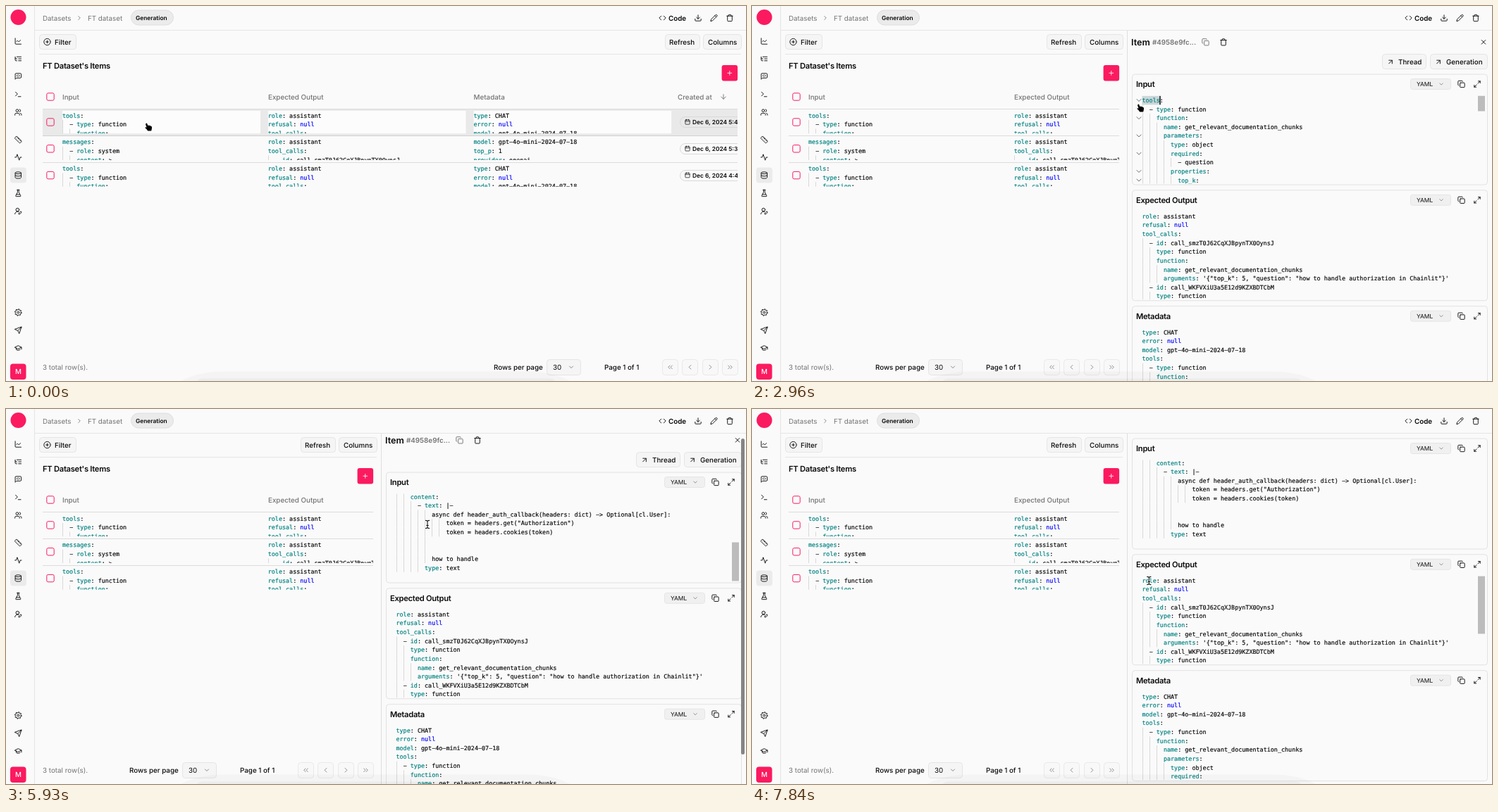
Animation, 1050 px wide and 533 px high, one loop 7990 ms. Source, as an HTML page with a canvas:

```html
<!DOCTYPE html>
<html lang="en">
<head>
<meta charset="utf-8">
<title>Dataset items</title>
<style>
html, body { margin: 0; width: 100%; height: 100%; overflow: hidden; background: #fafafa; }
canvas { display: block; width: 1050px; height: 533px; }
</style>
</head>
<body>
<canvas id="stage" width="1050" height="533"></canvas>
<script>
const ctx = document.getElementById('stage').getContext('2d');
const LOOP = 7990;
const INK = '#0a0a0a', MUTED = '#737373', LINE = '#e5e5e5', PAGE = '#fafafa', PINK = '#fb1a5f';
const MONO = 8.416, CHAR = MONO * 0.60205, ROW = 12.62, DOC_END = 166.5;

// Icons on a 24 unit grid
const disc = (x, y, r) => `M${x + r} ${y}a${r} ${r} 0 1 1-${2 * r} 0a${r} ${r} 0 1 1 ${2 * r} 0`;
const gear = () => {
  let d = '';
  for (let i = 0; i < 32; i++) {
    const a = (i + 0.5) * Math.PI / 16, r = i % 4 < 2 ? 10.5 : 7.6;
    d += `${i ? 'L' : 'M'}${(12 + r * Math.cos(a)).toFixed(1)} ${(12 + r * Math.sin(a)).toFixed(1)}`;
  }
  return d + 'Z' + disc(12, 12, 3);
};
const shapes = {
  chart: 'M3 3v16a2 2 0 0 0 2 2h16M19 9l-5 5-4-4-3 3',
  tree: 'M21 12h-8M21 6H8M21 18h-8M3 6v4c0 1.1.9 2 2 2h3M3 10v6c0 1.1.9 2 2 2h3',
  message: 'M21 15a2 2 0 0 1-2 2H7l-4 4V5a2 2 0 0 1 2-2h14a2 2 0 0 1 2 2zM10 7.5L8 10l2 2.5M14 7.5l2 2.5-2 2.5',
  terminal: 'M4 17l6-6-6-6M12 19h8',
  users: 'M16 21v-2a4 4 0 0 0-4-4H6a4 4 0 0 0-4 4v2M22 21v-2a4 4 0 0 0-3-3.9M16 3.1a4 4 0 0 1 0 7.8' + disc(9, 7, 4),
  ruler: 'M21.3 15.3a2.4 2.4 0 0 1 0 3.4l-2.6 2.6a2.4 2.4 0 0 1-3.4 0L2.7 8.7a2.4 2.4 0 0 1 0-3.4l2.6-2.6a2.4 2.4 0 0 1 3.4 0zM14.5 12.5l2-2M11.5 9.5l2-2M8.5 6.5l2-2M17.5 15.5l2-2',
  pulse: 'M22 12h-4l-3 9L9 3l-3 9H2',
  database: 'M21 5a9 3 0 1 1-18 0a9 3 0 1 1 18 0M3 5v14a9 3 0 0 0 18 0V5M3 12a9 3 0 0 0 18 0',
  flask: 'M10 2v7.5L4.5 20a1.5 1.5 0 0 0 1.3 2h12.4a1.5 1.5 0 0 0 1.3-2L14 9.5V2M8.5 2h7M7 16h10',
  userPen: 'M2 21a8 8 0 0 1 11-7.4M21.4 16.6a1 1 0 0 0-3-3l-4 4-1 4 4-1z' + disc(10, 8, 5),
  gear: gear(),
  send: 'M22 2l-7 20-4-9-9-4zM22 2L11 13',
  cap: 'M2 10l10-5 10 5-10 5zM6 12v5c3 3 9 3 12 0M22 10v6',
  code: 'M16 18l6-6-6-6M8 6l-6 6 6 6',
  download: 'M21 15v4a2 2 0 0 1-2 2H5a2 2 0 0 1-2-2v-4M7 10l5 5 5-5M12 15V3',
  pencil: 'M17 3a2.8 2.8 0 0 1 4 4L7.5 20.5 2 22l1.5-5.5zM15 5l4 4',
  trash: 'M3 6h18M19 6v14a2 2 0 0 1-2 2H7a2 2 0 0 1-2-2V6M8 6V4a2 2 0 0 1 2-2h4a2 2 0 0 1 2 2v2',
  addCircle: disc(12, 12, 10) + 'M8 12h8M12 8v8',
  plus: 'M5 12h14M12 5v14',
  copy: 'M10 8h10a2 2 0 0 1 2 2v10a2 2 0 0 1-2 2H10a2 2 0 0 1-2-2V10a2 2 0 0 1 2-2zM4 16a2 2 0 0 1-2-2V4a2 2 0 0 1 2-2h10a2 2 0 0 1 2 2',
  expand: 'M15 3h6v6M9 21H3v-6M21 3l-7 7M3 21l7-7',
  close: 'M18 6L6 18M6 6l12 12',
  open: 'M7 7h10v10M7 17L17 7',
  arrowDown: 'M12 5v14M19 12l-7 7-7-7',
  down: 'M6 9l6 6 6-6',
  right: 'M9 18l6-6-6-6',
  left: 'M15 18l-6-6 6-6',
  first: 'M11 17l-5-5 5-5M18 17l-5-5 5-5',
  last: 'M13 17l5-5-5-5M6 17l5-5-5-5',
  calendar: 'M8 2v4M16 2v4M5 4h14a2 2 0 0 1 2 2v14a2 2 0 0 1-2 2H5a2 2 0 0 1-2-2V6a2 2 0 0 1 2-2zM3 10h18'
};
const icons = Object.fromEntries(Object.entries(shapes).map(([k, d]) => [k, new Path2D(d)]));

const sidebar = [['chart', 50], ['tree', 75], ['message', 100], ['terminal', 125.5], ['users', 151], ['ruler', 190],
  ['pulse', 215], ['database', 240.5], ['flask', 266], ['userPen', 291.5], ['gear', 435.5], ['send', 461], ['cap', 486]];

// YAML documents
const lines = s => s.split('\n');
const model = 'model: gpt-4o-mini-2024-07-18';
const toolHead = `tools:
  - type: function
    function:`;
const toolSpec = `${toolHead}
      name: get_relevant_documentation_chunks
      parameters:
        type: object
        required:`;
const inputDoc = lines(`${toolSpec}
          - question
        properties:
          top_k:`);
const foldedDoc = lines(`tools:
messages:
  - role: system
    content: >-
      You are a helpful assistant who answers questions related to Chainlit in
      valid, well-rendering markdown. You have two tools at your disposal to
      retrieve context about the Chainlit documentation and Chainlit cookbooks.
      Keep it short, and if available prefer responding with code. Do not create
      facts outside of provided context. Never hallucinate or extrapolate on the
      documentation. Questions which are obviously not about getting help on
      building with Chainlit should be declined
      in a polite way.
  - role: user
    content:
      - text: |-
          async def header_auth_callback(headers: dict) -> Optional[cl.User]:
              token = headers.get("Authorization")
              token = headers.cookies(token)


          how to handle
        type: text`);
const outputDoc = lines(`role: assistant
refusal: null
tool_calls:
  - id: call_smzT0J62CqXJBpynTX0OynsJ
    type: function
    function:
      name: get_relevant_documentation_chunks
      arguments: '{"top_k": 5, "question": "how to handle authorization in Chainlit"}'
  - id: call_WKFVXiU3a5E12d9KZXBDTCbM
    type: function`);
const metaDoc = lines(`type: CHAT
error: null
${model}
${toolSpec}`);

const plainRow = [lines(toolHead), outputDoc.slice(0, 3), metaDoc.slice(0, 3)];
const rows = [
  { cells: plainRow, date: 'Dec 6, 2024 5:44 PM' },
  { cells: [
    ['messages:', '  - role: system', '    content: >-'],
    ['role: assistant', 'tool_calls:', outputDoc[3]],
    [model, 'top_p: 1', 'provider: openai']], date: 'Dec 6, 2024 5:38 PM' },
  { cells: plainRow, date: 'Dec 6, 2024 4:44 PM' }
];

// Stepped motion: [time, value...]
const pointer = [
  [0, 202, 172], [890, 215, 172], [1040, 262, 169], [1190, 345, 160], [1330, 440, 148], [1480, 515, 138],
  [1630, 556, 131], [1780, 565, 135], [1930, 567, 136], [2070, 565, 138], [2220, 560, 141], [2370, 554, 143],
  [2520, 551, 144], [2670, 551, 145], [4430, 556, 148], [4580, 575, 156], [4730, 592, 164], [4880, 598, 165],
  [5030, 598, 164], [6670, 594, 170], [6810, 586, 186], [6960, 575, 208], [7110, 567, 228], [7250, 564, 240],
  [7400, 563, 244], [7840, 563.3, 244]];
const panelScroll = [[0, 0], [5930, 7], [6070, 22], [6220, 39.2], [6370, 55]];
const docScroll = [[0, 0], [5480, 100], [5630, DOC_END]];
const caretOn = [[0, 0], [2070, 1], [2520, 0], [2960, 1], [3410, 0]];
const at = (steps, t) => steps.filter(s => s[0] <= t).pop();
const within = (t, a, b) => t >= a && t < b;
const fade = (t, a, b) => Math.max(0, Math.min(1, (b - t) / (b - a)));

// Drawing helpers
function rect(x, y, w, h, color) {
  ctx.fillStyle = color;
  ctx.fillRect(x, y, w, h);
}
function box(x, y, w, h, r, fill, stroke = LINE) {
  const inset = stroke ? 0.5 : 0;
  ctx.beginPath();
  ctx.roundRect(x + inset, y + inset, w - 2 * inset, h - 2 * inset, r);
  if (fill) { ctx.fillStyle = fill; ctx.fill(); }
  if (stroke) { ctx.strokeStyle = stroke; ctx.lineWidth = 1; ctx.stroke(); }
}
function text(s, x, y, { size = 9.8, weight = 500, color = INK, track = 0 } = {}) {
  ctx.font = `${weight} ${size}px Inter, sans-serif`;
  ctx.letterSpacing = `${track * size}px`;
  ctx.fillStyle = color;
  ctx.fillText(s, x, y + size * 0.36);
  ctx.letterSpacing = '0px';
}
const heading = (s, x, y) => text(s, x, y, { size: 11.2, weight: 600, track: -0.025 });
function icon(name, x, y, size = 11.2, color = INK, weight = 2) {
  ctx.save();
  ctx.translate(x - size / 2, y - size / 2);
  ctx.scale(size / 24, size / 24);
  ctx.strokeStyle = color;
  ctx.lineWidth = weight;
  ctx.lineCap = ctx.lineJoin = 'round';
  ctx.stroke(icons[name]);
  ctx.restore();
}
function clipped(x, y, w, h, draw) {
  ctx.save();
  ctx.beginPath();
  ctx.rect(x, y, w, h);
  ctx.clip();
  draw();
  ctx.restore();
}
// Wide hyphens and a hairline stroke give the sturdier editor look
function mono(s, x, y, color) {
  const wide = s.replaceAll('-', '\u2212');
  ctx.font = `${MONO}px "DejaVu Sans Mono", monospace`;
  ctx.fillStyle = ctx.strokeStyle = color;
  ctx.lineWidth = 0.18;
  ctx.fillText(wide, x, y + 3);
  ctx.strokeText(wide, x, y + 3);
}
function yamlLine(line, x, y) {
  const m = line.match(/^(\s*(?:- )?)(\w+)(:)(.*)$/);
  const parts = m
    ? [[m[1], INK], [m[2], '#008080'], [m[3], INK], [m[4], m[4] === ' null' ? '#0000ff' : INK]]
    : [[line, INK]];
  for (const [s, color] of parts) {
    const lead = s.length - s.trimStart().length;
    if (s.trim()) mono(s.trim(), x + lead * CHAR, y, color);
    x += s.length * CHAR;
  }
}
function yaml(doc, x, y) {
  doc.forEach((line, i) => {
    const cy = y + i * ROW, indent = line ? line.search(/\S/) : 10;
    for (let g = 0; g < indent; g += 2) rect(Math.round(x + g * CHAR), cy - ROW / 2, 1, ROW, '#d8d8d8');
    yamlLine(line, x, cy);
  });
}
function button(label, x, y, w, tx) {
  box(x, y, w, 22, 4, '#f5f5f5');
  text(label, tx, y + 11);
}
const checkbox = y => box(57.3, y - 5.7, 11.4, 11.4, 2, null, PINK);
const scrollThumb = (y, h, alpha) => rect(1030, y, 10, h, `rgba(100,100,100,${0.42 * alpha})`);

function drawShell() {
  rect(0, 0, 1050, 533, PAGE);
  rect(40, 0, 1, 533, LINE);
  rect(41, 34, 1009, 1, LINE);
  ctx.fillStyle = PINK;
  ctx.beginPath();
  ctx.arc(17.5, 16, 11, 0, 7);
  ctx.fill();
  box(6, 229.5, 23, 22, 4, '#ebebeb', null);
  for (const [name, y] of sidebar) icon(name, 17.3, y);
  box(6, 508.5, 22.5, 22.5, 4, PINK, null);
  text('M', 13, 519.7, { color: '#fff' });

  text('Datasets', 52, 17, { weight: 400, color: MUTED });
  icon('right', 104, 17, 10, MUTED);
  text('FT dataset', 116, 17, { weight: 400, color: MUTED });
  box(177, 5.5, 61, 22, 11, '#ebebeb', '#dedede');
  text('Generation', 184, 16.7, { size: 8.4, weight: 600 });
  icon('code', 931.5, 17);
  text('Code', 940, 17, { weight: 600 });
  icon('download', 982, 17);
  icon('pencil', 1004.5, 17);
  icon('trash', 1027, 17);
}

function drawTable(split, hover) {
  const dx = split ? -517 : 0, edge = 1038 + dx;
  button('Filter', 47, 40, 53, 69);
  icon('addCircle', 58.5, 51);
  button('Refresh', 935 + dx, 40, 50, 941 + dx);
  button('Columns', 989 + dx, 40, 55, 996 + dx);
  rect(47, 68, 996 + dx, 1, LINE);
  heading("FT Dataset's Items", 52, 85);
  box(1015.6 + dx, 84, 22.5, 22.5, 3, PINK, null);
  icon('plus', 1026.8 + dx, 95.3, 10, '#fff');

  clipped(47, 110, edge - 47, 160, () => {
    if (hover) rect(52, 147, 986, 37, '#e9e9e9');
    checkbox(129);
    const label = { color: MUTED };
    text('Input', 80, 129, label);
    text('Expected Output', 372, 129, label);
    text('Metadata', 663.5, 129, label);
    text('Created at', 953, 129, label);
    icon('arrowDown', 1018, 129, 11.2, MUTED);
    for (let i = 0; i < 3; i++) rect(52, Math.round(146 + 37.8 * i), 986, 1, i === 1 && hover ? '#d0d0d0' : '#dcdcdc');
    rows.forEach((row, i) => {
      const y = 165 + 37.8 * i;
      checkbox(y);
      row.cells.forEach((cell, c) => {
        const x = 80 + 291.7 * c;
        clipped(x, y - 16, 281, 32.2, () => {
          if (hover && !i) rect(x, y - 16, 281, 33, '#fcfcfc');
          yaml(cell, x, y - 9.4);
        });
      });
      box(956, Math.round(y - 8), 110, 16, 8, null, '#d9d9d9');
      icon('calendar', 967, y - 0.3, 8.4);
      text(row.date, 974, y, { size: 8.4, weight: 600 });
    });
  });

  text('3 total row(s).', 52, 513.3, { weight: 400, color: MUTED });
  text('Rows per page', 692 + dx, 513.3);
  box(767 + dx, 502, 49, 23, 4, '#f5f5f5');
  text('30', 776 + dx, 513.3, { weight: 400 });
  icon('down', 802 + dx, 513.3, 10, MUTED);
  text('Page 1 of 1', 849 + dx, 513.3);
  ['first', 'left', 'right', 'last'].forEach((name, i) => {
    const x = 931 + dx + Math.round(28.4 * i);
    box(x, 502, 23, 23, 4, '#f8f8f8', '#e9e9e9');
    icon(name, x + 11.5, 513.3, 11.2, '#868686');
  });
}

function drawCard(title, y, content) {
  box(539, y, 505, 158, 4, PAGE, '#e2e2e2');
  heading(title, 545, y + 14.3);
  box(934, y + 6.5, 58, 16, 3, '#f0f0f0');
  text('YAML', 943, y + 14.3, { size: 8.4, weight: 400 });
  icon('down', 978, y + 14.5, 9, MUTED);
  icon('copy', 1006.5, y + 14.5);
  icon('expand', 1029, y + 14.5);
  clipped(541, y + 31, 500, 125, content);
}

function drawInput(t) {
  const scroll = at(docScroll, t)[1], top = 127.5, x = 553.5, y = 134 - scroll;
  const folded = t >= 3410, marked = within(t, 2070, 4880);
  const mark = (col, row, color) => rect(x + col * CHAR, y + row * ROW - 6.3, 5 * CHAR, 12.6, color);
  if (folded) rect(553, y - 6.3, 477, 12.6, marked ? '#e7e7e7' : '#ececec');
  if (marked) {
    mark(0, 0, '#cbd6d8');
    if (folded) mark(foldedDoc[5].indexOf('tools'), 5, '#dbe5f1');
  }
  yaml(folded ? foldedDoc : inputDoc, x, y);
  if (folded) {
    mono('-', 585, y, '#8a8a8a');
    icon('right', 549, y, 12, '#555', 1.7);
  }
  if (within(t, 2070, 4580)) {
    const open = folded ? [1, 2, 3] : [0, 1, 2, 4, 6, 8, 9];
    for (const i of open) icon('down', 549, y + i * ROW, 12, '#555', 1.7);
  }
  if (at(caretOn, t)[1]) rect(578.3, y - 6.3, 1.4, 12.6, '#000');
  const alpha = t < 1480 ? fade(t, 890, 1480) : fade(t, 6810, 7400);
  scrollThumb(top + scroll / DOC_END * 69, folded ? 55 : 22, alpha);
}

function drawPanel(t) {
  const loaded = t >= 590, scroll = at(panelScroll, t)[1], early = fade(t, 890, 1480);
  rect(532, 35, 518, 498, PAGE);
  rect(532, 35, 1, 498, '#dedede');
  clipped(533, 35, 517, 498, () => {
    ctx.translate(0, -scroll);
    text('Item', 538, 51.3, { size: 12.6, weight: 600 });
    text('#4958e9fc...', 568, 51.3, { weight: 600, color: MUTED });
    icon('copy', 643.5, 51.3, 11.2, MUTED);
    icon('trash', 669, 51.3);
    icon('close', 1038, 51.3);
    button('Thread', 894, 68, 63, 917);
    icon('open', 906, 79.5);
    button('Generation', 962, 68, 82, 985);
    icon('open', 974, 79.5);
    drawCard('Input', 96.5, () => loaded && drawInput(t));
    drawCard('Expected Output', 261.3, () => {
      if (!loaded) return;
      yaml(outputDoc, 553.5, 298.8);
      scrollThumb(292.5, 82, t >= 7250 ? 1 : early);
    });
    drawCard('Metadata', 426.2, () => {
      if (!loaded) return;
      yaml(metaDoc, 553.5, 463.6);
      scrollThumb(457.3, 24, early);
    });
  });
  if (t >= 5930) {
    ctx.globalAlpha = fade(t, 6670, 7540);
    box(1043, 35.6 + scroll * 0.906, 5, 449, 2.5, '#858585', null);
    ctx.globalAlpha = 1;
  }
}

function drawPointer(t) {
  const [, x, y] = at(pointer, t);
  const hand = x < 540 || within(t, 2370, 4430);
  ctx.save();
  ctx.translate(x, y);
  ctx.lineJoin = ctx.lineCap = 'round';
  if (hand) {
    const shape = new Path2D('M-3.5-5Q-2.4-6-1.6-4.6L-.6-2Q.6-3 1.4-1.9Q2.6-2.6 3.2-1.3Q4.6-1.6 4.9-.2Q5.4 2.2 4.2 5.6H-.8Q-2 3-4.6 1.2Q-4.6-.2-2.4.6L-4-3.8Z');
    ctx.strokeStyle = '#fff';
    ctx.lineWidth = 1.8;
    ctx.stroke(shape);
    ctx.fillStyle = '#000';
    ctx.fill(shape);
  } else {
    const beam = new Path2D('M-2.6-5.6Q-.2-5.6 0-4.4Q.2-5.6 2.6-5.6M0-4.4V4.4M-2.6 5.6Q-.2 5.6 0 4.4Q.2 5.6 2.6 5.6M-1.3 1.5H1.3');
    for (const [color, width] of [['rgba(255,255,255,.8)', 2.4], ['#111', 1.1]]) {
      ctx.strokeStyle = color;
      ctx.lineWidth = width;
      ctx.stroke(beam);
    }
  }
  ctx.restore();
}

function drawBottomShade() {
  ctx.fillStyle = 'rgba(0,0,0,.025)';
  ctx.beginPath();
  ctx.moveTo(248, 533);
  ctx.quadraticCurveTo(272, 519.5, 310, 519.5);
  ctx.lineTo(738, 519.5);
  ctx.quadraticCurveTo(776, 519.5, 800, 533);
  ctx.fill();
  box(268, 529.5, 514, 20, 10, 'rgba(0,0,0,.03)', null);
}

function frame() {
  const t = performance.now() % LOOP, split = t >= 450;
  ctx.textRendering = 'geometricPrecision';
  drawShell();
  drawTable(split, t < 1480);
  if (split) drawPanel(t);
  drawBottomShade();
  drawPointer(t);
  requestAnimationFrame(frame);
}
frame();
</script>
</body>
</html>
```
